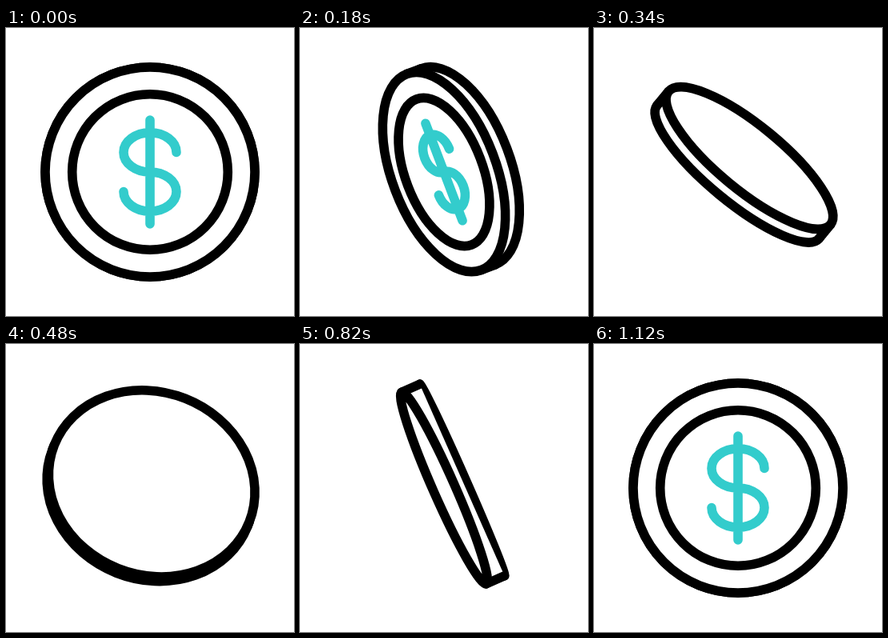
Animation of 360x360 px, one loop 1.4 s. Source, as an HTML page with a canvas:

```html
<!DOCTYPE html>
<html lang="en">
<head>
<meta charset="utf-8">
<title>Spinning coin</title>
<style>
  html, body { margin: 0; width: 100%; height: 100%; overflow: hidden; background: #fff; }
  canvas { display: block; width: 360px; height: 360px; }
</style>
</head>
<body>
<canvas id="stage" width="360" height="360"></canvas>
<script>
const ctx = document.getElementById('stage').getContext('2d');
const LOOP = 1400, STEP = 20, FLIP = 560;
const RIM = 131, RING = 97.3, LINE = 11.6, THICK = 25, LEAN = 71.5;
const INK = '#000', TEAL = '#33cccc', PAPER = '#fff';

const ease = x => 0.9 * x * x * (3 - 2 * x) + 0.1 * x;

// Two half turns: front to back, then back to front.
function pose(t) {
  const opening = t < FLIP;
  const x = Math.min(1, opening ? t / FLIP : t / FLIP - 1);
  const turn = 1 - 2 * ease(x);
  const swing = Math.sin(x * Math.PI / 2);
  const side = 1 - turn * turn;
  const showFront = opening === turn > 0;
  return {
    showFront,
    squash: Math.abs(turn),
    tilt: LEAN * (opening ? swing ** 1.7 : 1 - swing) * Math.PI / 180,
    // The edge thins faster while the front comes back.
    depth: THICK * (showFront && !opening ? side * side : side),
    // The face seen first in each half stays on the pivot.
    nearOnPivot: turn > 0
  };
}

function stroke(color) {
  ctx.strokeStyle = color;
  ctx.stroke();
}

function disc(x, r, squash) {
  ctx.beginPath();
  ctx.ellipse(x, 0, r * squash, r, 0, 0, 2 * Math.PI);
  ctx.fillStyle = PAPER;
  ctx.fill();
  stroke(INK);
}

function edge(depth) {
  ctx.fillStyle = PAPER;
  ctx.fillRect(0, -RIM, depth, 2 * RIM);
  ctx.beginPath();
  for (const y of [-RIM, RIM]) {
    ctx.moveTo(0, y);
    ctx.lineTo(depth, y);
  }
  stroke(INK);
}

function dollar(x, squash) {
  const rx = 33 * squash, ry = 24.6, q = Math.PI / 2;
  ctx.beginPath();
  ctx.moveTo(x, -65);
  ctx.lineTo(x, 65);
  ctx.moveTo(x + rx, -ry);
  ctx.ellipse(x, -ry, rx, ry, 0, 0, q, true);
  ctx.ellipse(x, ry, rx, ry, 0, -q, 2 * q);
  stroke(TEAL);
}

function draw(t) {
  const { showFront, squash, tilt, depth, nearOnPivot } = pose(t);
  const near = nearOnPivot ? 0 : depth;
  const far = depth - near;

  ctx.setTransform(1, 0, 0, 1, 0, 0);
  ctx.fillStyle = PAPER;
  ctx.fillRect(0, 0, 360, 360);
  ctx.translate(180, 180);
  ctx.rotate(-tilt);
  ctx.lineWidth = LINE;
  ctx.lineCap = ctx.lineJoin = 'round';

  // The far face flattens a little more when seen almost edge-on.
  disc(far, RIM, squash * Math.min(1, 3 * squash));
  edge(depth);
  disc(near, RIM, squash);
  if (showFront) {
    disc(near, RING, squash);
    dollar(near, squash);
  }
}

function tick() {
  const t = performance.now() % LOOP;
  draw(Math.floor(t / STEP) * STEP);
  requestAnimationFrame(tick);
}
tick();
</script>
</body>
</html>
```
